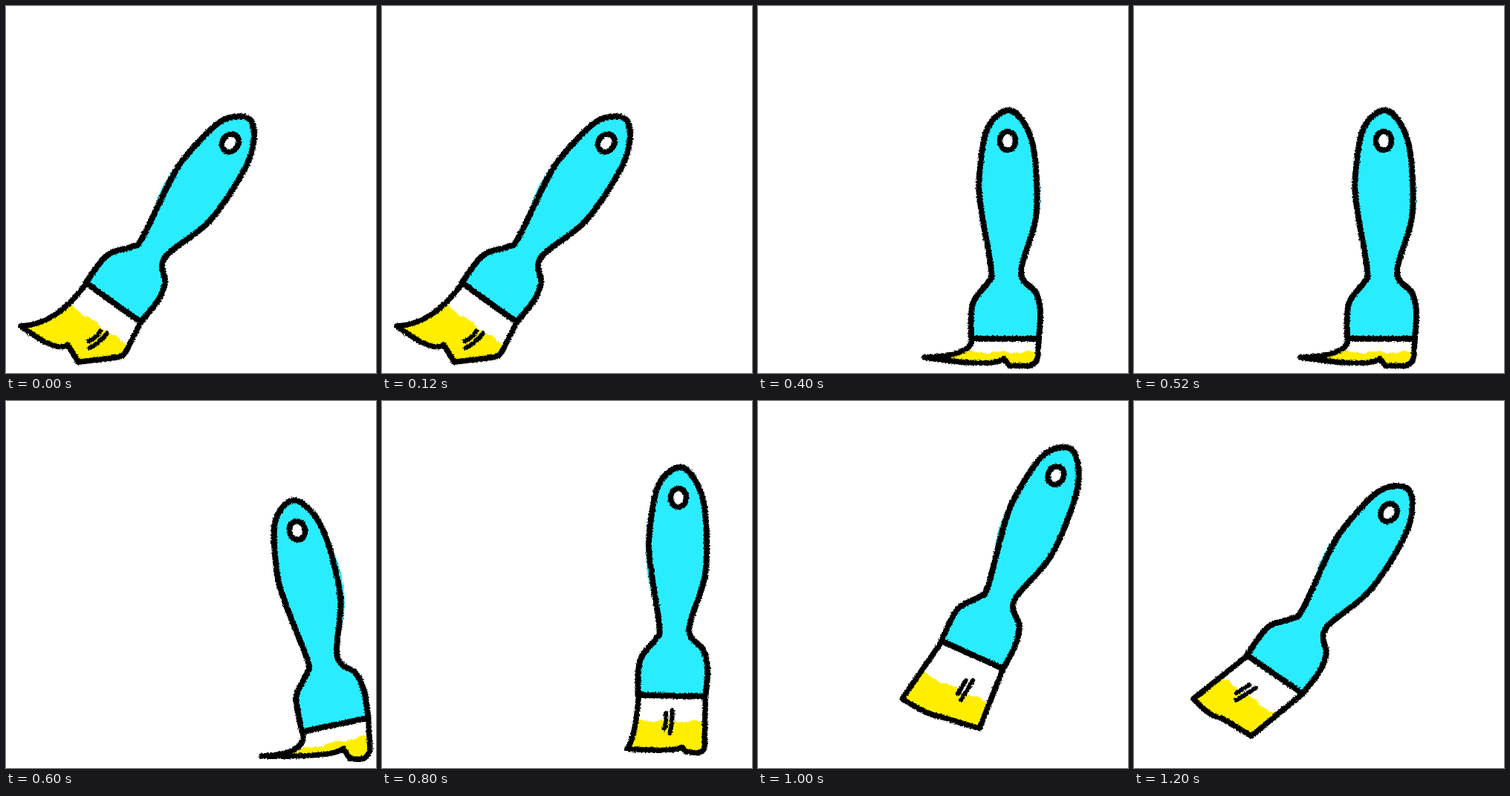
An HTML page with a canvas that plays this animation: 498x493 px, repeating every 1400 ms.

```html
<!DOCTYPE html>
<html lang="en">
<head>
<meta charset="utf-8">
<title>Paintbrush</title>
<style>
  html, body { margin: 0; width: 100%; height: 100%; overflow: hidden; background: #fff; }
  canvas { display: block; filter: url(#rough); }
  svg { position: absolute; }
</style>
</head>
<body>
<svg width="0" height="0">
  <filter id="rough" x="0" y="0" width="1" height="1" color-interpolation-filters="sRGB">
    <feTurbulence type="fractalNoise" baseFrequency=".5" numOctaves="2" seed="4"/>
    <feDisplacementMap in="SourceGraphic" scale="4" xChannelSelector="R" yChannelSelector="G"/>
  </filter>
</svg>
<canvas id="stage" width="498" height="493"></canvas>
<script>
const ctx = document.getElementById('stage').getContext('2d');
const STEP = 200, CYAN = '#2aecff', YELLOW = '#ffee00', FERRULE = 266;

// hole: x, y; tilt in degrees. The hair runs from the ferrule to tip, notch, heel and back.
// bend: how far the hair is pressed flat; depth: ferrule to yellow;
// marks: x, y, degrees; slip: sideways offset of the colour under the grip.
const poses = [
  { hole: [302, 184], tilt: 35.6, tip: [20, 430], notch: [83, 455], heel: [158, 471], bend: 1, depth: 36, marks: [122, 446, 50] },
  { hole: [308, 183], tilt: 19.6, tip: [97, 441], notch: [206, 472], heel: [254, 489], bend: 1, depth: 23, marks: [208, 457, 56], slip: -3 },
  { hole: [336, 181], tilt: 0, tip: [224, 472], notch: [331, 474], heel: [376, 484], bend: 1, depth: 18, slip: 2 },
  { hole: [392, 174], tilt: -11.8, tip: [344, 477], notch: [454, 467], heel: [491, 482], bend: 1, depth: 23, slip: 4 },
  { hole: [399, 130], tilt: 1.2, tip: [330, 467], notch: [404, 465], heel: [434, 474], bend: .6, depth: 34, marks: [385, 430, 6] },
  { hole: [401, 100], tilt: 24.3, tip: [194, 400], notch: [246, 424], heel: [298, 440], bend: 0, depth: 50, marks: [278, 386, 31] },
  { hole: [343, 150], tilt: 34.5, tip: [80, 400], notch: [118, 426], heel: [158, 450], bend: 0, depth: 44, marks: [149, 390, 58] }
];

// Smooth curve through all points, closed by a straight line.
function smooth(points) {
  const path = new Path2D();
  const at = i => points[Math.max(0, Math.min(points.length - 1, i))];
  path.moveTo(...points[0]);
  for (let i = 0; i < points.length - 1; i++) {
    const [a, b, c, d] = [at(i - 1), at(i), at(i + 1), at(i + 2)];
    path.bezierCurveTo(
      b[0] + (c[0] - a[0]) / 6, b[1] + (c[1] - a[1]) / 6,
      c[0] - (d[0] - b[0]) / 6, c[1] - (d[1] - b[1]) / 6, ...c);
  }
  path.closePath();
  return path;
}

function ellipse(x, y, rx, ry) {
  const path = new Path2D();
  path.ellipse(x, y, rx, ry, 0, 0, 2 * Math.PI);
  return path;
}

// Handle parts, relative to the centre of the hole.
const handle = smooth([
  [-49, FERRULE], [-47, 219], [-27, 191], [-22, 174], [-36, 90], [-38, 46], [-27, -17],
  [2, -41], [26, -17], [37, 25], [38, 103], [18, 176], [38, 204], [44, 230], [42, FERRULE]
]);
const eye = ellipse(0, 0, 10.5, 12.5);

function line(path, width) {
  ctx.lineWidth = width;
  ctx.stroke(path);
}

function fill(path, color) {
  ctx.fillStyle = color;
  ctx.fill(path);
}

// Draws in a frame moved to x, y and turned by some degrees.
function placed([x, y], degrees, paint) {
  ctx.save();
  ctx.translate(x, y);
  ctx.rotate(degrees * Math.PI / 180);
  paint();
  ctx.restore();
}

function hairShape({ hole, tilt, tip, notch, heel, bend }) {
  const cos = Math.cos(tilt * Math.PI / 180), sin = Math.sin(tilt * Math.PI / 180);
  const root = x => [hole[0] + x * cos - FERRULE * sin, hole[1] + x * sin + FERRULE * cos];
  const left = root(-48), right = root(42);
  // Pressed hair follows the brush axis down, then turns towards the tip.
  const drop = tip[1] - 2 - left[1];
  const knee = [left[0] - drop * sin / cos, left[1] + drop];
  const mix = i => (left[i] + tip[i]) / 2 * (1 - bend) + knee[i] * bend;
  const lean = Math.abs(tilt);

  const path = new Path2D();
  path.moveTo(...left);
  path.quadraticCurveTo(mix(0), mix(1), ...tip);
  path.quadraticCurveTo(notch[0] - 14, notch[1] + 12 * bend, ...notch);
  path.lineTo(notch[0] + (7 + lean / 5) * bend, notch[1] + (9 + lean * .4) * bend);
  path.arcTo(...heel, ...right, 1 + 14 * bend);
  path.lineTo(...right);
  return path;
}

function paintEdge(depth) {
  const path = new Path2D();
  for (let x = -150; x <= 80; x += 5) {
    path.lineTo(x, FERRULE + depth + 1.6 * Math.sin(x * .16) + Math.sin(x * .41));
  }
  path.lineTo(80, 400);
  path.lineTo(-150, 400);
  return path;
}

function drawHair(pose) {
  const shape = hairShape(pose);
  ctx.save();
  ctx.clip(shape);
  placed(pose.hole, pose.tilt, () => fill(paintEdge(pose.depth), YELLOW));
  ctx.restore();
  line(shape, 7.5);
  if (pose.marks) {
    const bow = 4 * pose.bend;
    placed(pose.marks, pose.marks[2], () =>
      line(new Path2D(`M-4 11Q${bow - 4} 2 -4 -10M4 16Q${bow + 4} 0 4 -15`), 6));
  }
}

function drawHandle({ hole, tilt, slip = 0 }) {
  placed(hole, tilt, () => {
    fill(ellipse(slip, 75, 42, 85), CYAN);
    fill(handle, CYAN);
    line(handle, 8);
    fill(eye, '#fff');
    line(eye, 7.5);
  });
}

function draw() {
  const pose = poses[Math.floor(performance.now() / STEP) % poses.length];
  ctx.clearRect(0, 0, 498, 493);
  ctx.lineCap = ctx.lineJoin = 'round';
  drawHair(pose);
  drawHandle(pose);
  requestAnimationFrame(draw);
}
draw();
</script>
</body>
</html>
```
